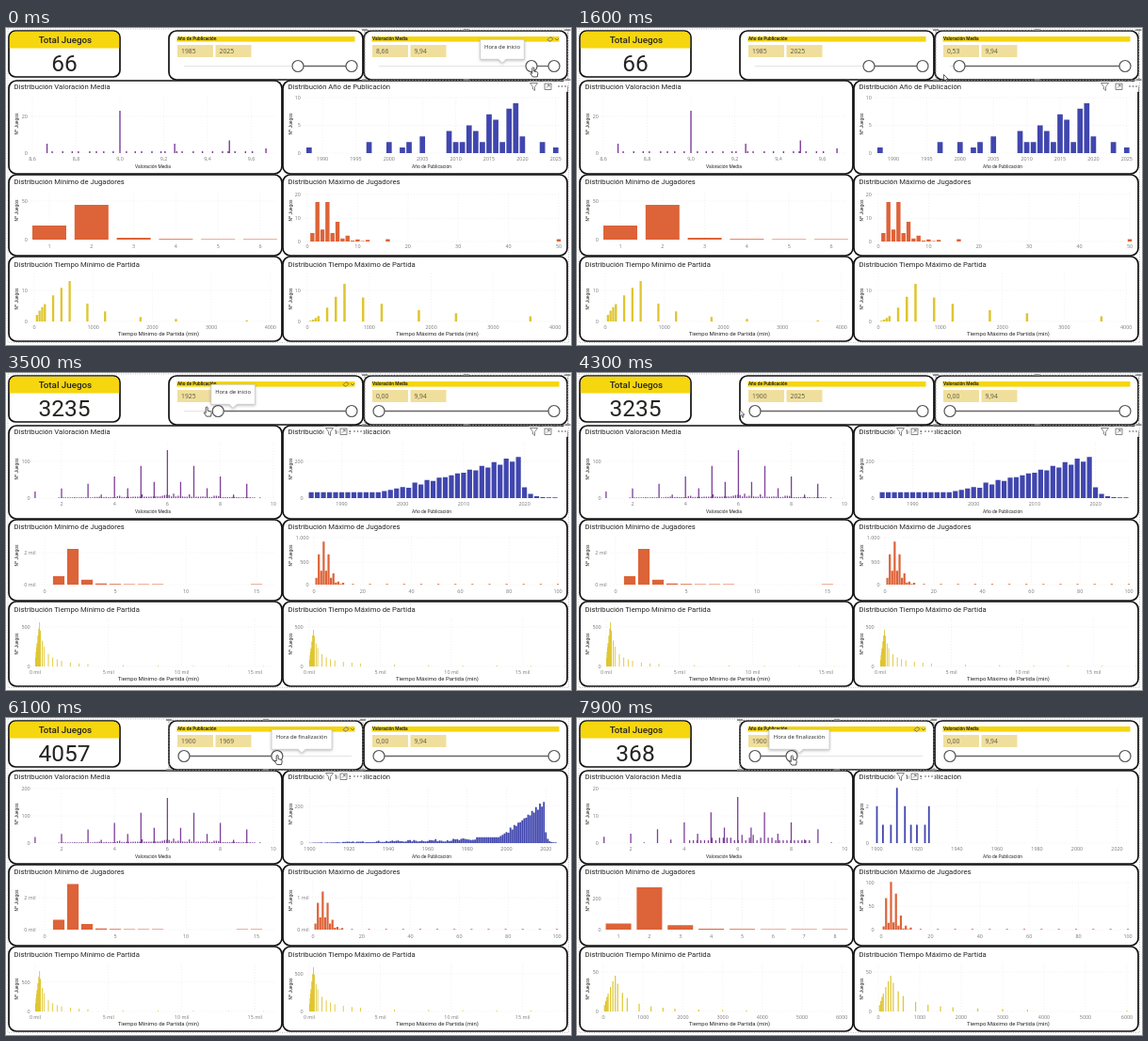
Animation of 600x337 px, one loop 8 s. Source, as an HTML page:

```html
<!DOCTYPE html>
<html lang="es">
<head>
<meta charset="utf-8">
<title>Total Juegos</title>
<style>
html, body { margin: 0; width: 100%; height: 100%; overflow: hidden; background: #fff; }
svg { display: block; width: 100vw; height: 100vh; }
text { font-family: Roboto, sans-serif; fill: #252423; }
.num { font-family: "Open Sans", sans-serif; fill: #777; }
.field { font-family: "Open Sans", sans-serif; fill: #5a5646; }
.mid { text-anchor: middle; }
.end { text-anchor: end; }
.grid { stroke: #e9e9e9; stroke-width: .6; stroke-dasharray: 1 2; }
.panel { fill: #fff; stroke: #111; stroke-width: 1.7; }
.icon { fill: none; stroke: #666; stroke-width: .8; }
</style>
</head>
<body>
<svg id="stage" viewBox="0 0 600 337"></svg>
<script>
const LOOP = 8000;
const YELLOW = '#f5d60f';

let seed = 7;
const rand = () => (seed = seed * 16807 % 2147483647) / 2147483647;

const text = (x, y, size, str, cls = '', extra = '') =>
  `<text x="${x}" y="${y}" font-size="${size}" class="${cls}" ${extra}>${str}</text>`;
const rect = (x, y, w, h, attrs) => `<rect x="${x}" y="${y}" width="${w}" height="${h}" ${attrs}/>`;
const group = (id, body) => `<g id="${id}">${body}</g>`;

// Bars are [axis value, height in px] pairs.
const range = (from, to, step = 1) =>
  Array.from({ length: Math.floor((to - from) / step + 1.001) }, (_, i) => from + i * step);
const bars = (values, height) => values.map(v => [v, height(v)]);
const bell = (x, mid, spread) => Math.exp(-(((x - mid) / spread) ** 2));

// Ratings cluster on whole and half points around 6.
const ratingPeaks = top => bars(range(1, 9.5, .5), v =>
  v % 1 ? top * .36 * bell(v, 6, 2) : top * Math.exp(-.4 * Math.abs(v - 6)));
const ratingNoise = bars(range(1.9, 9.3, .085), v => {
  const b = bell(v, 6, 2.1);
  return .7 + b + (rand() > .6 ? 3.2 * b * rand() : 0);
});
const ratingFew = bars(range(4.2, 8.8, .14), v => 2.9 * (1 + Math.floor(rand() * 3 * bell(v, 6, 1.5))));
const topRatings = [...bars(range(8.68, 9.6, .04).map(v => v + rand() * .03), () => 2),
  [8.667, 10], [9, 45], [9.25, 10], [9.5, 13.5], [9.667, 5]];

// Releases: a flat start, steady growth until 2018, then a collapse.
const releases = y => y > 2019 ? 11 * .35 ** (y - 2020) + .6
  : 6.3 + 35 * Math.max(0, (Math.min(y, 2018) - 1996) / 22) ** 1.1 + (y > 2000 ? 2.5 * Math.cos(y * 3) : 0);
const recentYears = bars(range(1985, 2025), releases);
const oldYears = bars(range(1900, 1984), y => (.4 + (y - 1900) / 17) * (.4 + .6 * rand()));
const topYears = [
  ...bars(range(2009, 2020), y => 5.9 * Math.round(2.5 * 1.107 ** (y - 2009) * (1 + .6 * Math.cos((y - 2009.1) * 2)))),
  ...bars([1988, 2002, 2025], () => 5.9), ...bars([1997, 2000, 2003, 2023], () => 11.8), [2005, 17.7]];
const firstYears = [...bars(range(1900, 1926, 3.4).map(Math.round), () => 19.6),
  ...bars([1900, 1914, 1926], () => 39.2), [1910, 58.8]];

const minPlayers = (one, two, decay, last) => bars(range(1, last), n =>
  n === 1 ? one : n === 2 ? two : two * decay ** (n - 2) + .6);
// Even player counts dominate; sparse crumbs follow further out.
const maxPlayers = (top, mid, odd, crumbs, crumbHeight) => [
  ...bars(range(1, 12), n => top * (n % 2 ? odd : 1) * (bell(n, mid, 3.3) + .04)),
  ...bars(crumbs, () => crumbHeight)];
const crumbs = range(16, 100, 7);

// Round durations: steps widen as the values grow.
function ladder(first, rungs) {
  const values = [first];
  for (const [until, step] of rungs) values.push(...range(values[values.length - 1] + step, until, step));
  return values;
}
const allTimes = ladder(30, [[120, 30], [360, 60], [600, 120], [1800, 300], [3600, 600], [18000, 2400]]);
const fewTimes = ladder(45, [[180, 45], [600, 140], [1200, 300], [2400, 600], [3600, 1200]]);
const durations = (times, mode, top, rise, fall) =>
  bars(times, t => top * (t < mode ? (t / mode) ** rise : (mode / t) ** fall));

// axis: [px at 0, px per unit, first tick, last tick, step]; y: [label, px] pairs; w: bar width
const comma = v => v.toFixed(1).replace('.', ',');
const mil = v => v / 1000 + ' mil';
const year = (px, per, from, first, last, step) => [px - from * per, per, first, last, step];
const view = (axis, y, w, bars, fmt = String) => ({ axis, y, w, bars, fmt });
const ratingAxis = [2.8, 28.1, 2, 10, 2], playersAxis = [41, 15, 0, 15, 5];
const kiloLeft = [31, .01555, 0, 15000, 5000], kiloRight = [322, .0151, 0, 15000, 5000];

const charts = [
  { title: 'Distribución Valoración Media', axisTitle: 'Valoración Media', color: '#7d3f98', col: 0, row: 0, views: [
    view(year(28, 232.5, 8.6, 8.6, 9.65, .2), [['0', 133], ['20', 94]], 1.4, topRatings, comma),
    view(ratingAxis, [['0', 133], ['100', 94]], 1.3, [...ratingNoise, ...ratingPeaks(51)]),
    view(ratingAxis, [['0', 133], ['100', 104], ['200', 75]], 1.3, [...ratingNoise, ...ratingPeaks(48)]),
    view([.3, 28.4, 2, 10, 2], [['0', 133], ['10', 104], ['20', 75]], 1.3, [...ratingFew, ...ratingPeaks(49)])
  ] },
  { title: 'Distribución Año de Publicación', axisTitle: 'Año de Publicación', color: '#4046ae', col: 1, row: 0, views: [
    view(year(336, 7.08, 1990, 1990, 2025, 5), [['0', 133], ['5', 103.5], ['10', 74]], 5.7, topYears),
    view(year(356.5, 6.47, 1990, 1990, 2020, 10), [['0', 133], ['200', 94]], 5.2, recentYears),
    view(year(322.5, 2.09, 1900, 1900, 2020, 20), [['0', 133], ['200', 94]], 1.8, [...oldYears, ...recentYears]),
    view(year(318.5, 2.125, 1900, 1900, 2020, 20), [['0', 133], ['2', 94]], 1.8, firstYears)
  ] },
  { title: 'Distribución Mínimo de Jugadores', color: '#dd6338', col: 0, row: 1, views: [
    view([1.2, 44.8, 1, 6, 1], [['0', 225], ['50', 184]], 36, minPlayers(15, 37, .04, 6)),
    view(playersAxis, [['0 mil', 225], ['2 mil', 191]], 12.2, [...minPlayers(9, 38, .12, 8), [15, .6]]),
    view(playersAxis, [['0 mil', 225], ['2 mil', 191]], 12.2, [...minPlayers(10.5, 48.5, .11, 8), [14, .5], [15, .6]]),
    view([11.2, 32.85, 1, 8, 1], [['0', 225], ['200', 192]], 27, minPlayers(6.5, 45, .09, 8))
  ] },
  { title: 'Distribución Máximo de Jugadores', color: '#dd6338', col: 1, row: 1, views: [
    view([320, 5.34, 0, 50, 10], [['0', 227], ['10', 202.5], ['20', 177]], 4.4, maxPlayers(44, 3, .28, [16, 50], 2.5)),
    view([327, 2.59, 0, 100, 20], [['0', 225], ['500', 201], ['1.000', 175]], 2.2, maxPlayers(44, 4, .35, crumbs, .8)),
    view([326, 2.59, 0, 100, 20], [['0 mil', 225], ['1 mil', 191]], 2.2, maxPlayers(39, 4, .35, crumbs, .8)),
    view([323, 2.62, 0, 100, 20], [['0', 225], ['50', 200], ['100', 175]], 2.2, maxPlayers(49, 4.2, .16, crumbs, .8))
  ] },
  { title: 'Distribución Tiempo Mínimo de Partida', axisTitle: 'Tiempo Mínimo de Partida (min)', color: '#dfc52f', col: 0, row: 2, views: [
    view([30, .0627, 0, 4000, 1000], [['0', 312], ['10', 279]], 2.3, durations(fewTimes, 600, 43, .7, 2)),
    view(kiloLeft, [['0', 312], ['500', 270]], .9, durations(allTimes, 300, 47, .7, 1.15), mil),
    view(kiloLeft, [['0', 312], ['500', 281]], .9, durations(allTimes, 300, 43, .7, 1.15), mil),
    view([28, .0422, 0, 6000, 1000], [['0', 312], ['50', 270]], 1.2, durations(allTimes, 300, 38, .75, 1.4))
  ] },
  { title: 'Distribución Tiempo Máximo de Partida', axisTitle: 'Tiempo Máximo de Partida (min)', color: '#dfc52f', col: 1, row: 2, views: [
    view([320, .0658, 0, 4000, 1000], [['0', 312], ['10', 279]], 2.5, durations(fewTimes, 600, 40, 1.6, 1.1)),
    view(kiloRight, [['0', 312], ['500', 270]], .9, durations(allTimes, 300, 39, .75, 1), mil),
    view(kiloRight, [['0', 312], ['500', 272]], .9, durations(allTimes, 300, 47, .75, 1), mil),
    view([320, .044, 0, 6000, 1000], [['0', 312], ['50', 270]], 1.2, durations(allTimes, 300, 38, .75, 1.2))
  ] }
];

const columns = [{ x: 3, w: 290, first: 26, axisMid: 156 }, { x: 294, w: 302, first: 316, axisMid: 452 }];
const rows = [
  { y: 56, h: 99, title: 65.4, base: 133, ticks: 141, axis: 148.5, size: 4.9, label: 102 },
  { y: 156, h: 86, title: 166, ticks: 234, label: 194 },
  { y: 243, h: 90, title: 253.5, ticks: 319.5, axis: 327, size: 6, label: 288 }
];

function drawView(chart, v) {
  const { x: left, w, first } = columns[chart.col], row = rows[chart.row];
  const [origin, unit, from, to, step] = v.axis;
  const base = v.y[0][1], right = left + w - 8;
  const labelEnd = first - 9 + 2.9 * Math.max(...v.y.map(([label]) => label.length));
  let out = '';
  for (const [label, y] of v.y) {
    out += `<path class="grid" d="M${first} ${y}H${right}"/>` + text(labelEnd, y + 1.8, 5.4, label, 'num end');
  }
  for (const tick of range(from, to, step)) {
    const x = origin + tick * unit;
    out += `<path class="grid" d="M${x} ${row.y + 18}V${base}"/>` + text(x, row.ticks, 5.4, v.fmt(tick), 'num mid');
  }
  const d = v.bars.filter(([, h]) => h > .3)
    .map(([x, h]) => `M${(origin + x * unit - v.w / 2).toFixed(2)} ${base}v${-h.toFixed(2)}h${v.w}v${h.toFixed(2)}z`).join('');
  return out + `<path d="${d}" fill="${chart.color}"/>`;
}

function drawChart(chart, i) {
  const c = columns[chart.col], r = rows[chart.row], labelX = c.x + 9.5;
  return rect(c.x, r.y, c.w, r.h, 'rx="8" class="panel"')
    + chart.views.map((v, k) => group(`view${i}${k}`, drawView(chart, v))).join('')
    + text(c.x + 5.5, r.title, 7.7, chart.title)
    + text(labelX, r.label, 4.9, 'Nº Juegos', 'mid', `transform="rotate(-90 ${labelX} ${r.label})"`)
    + (r.axis ? text(c.axisMid + (r.size > 5 ? 6 : 0), r.axis, r.size, chart.axisTitle, 'mid') : '');
}

const handle = id => `<circle id="${id}" cy="40.5" r="6" fill="#fff" stroke="#555" stroke-width="1.2"/>`;

function drawSlicer(id, x, w, title, trackFrom, trackTo) {
  return rect(x, 3, w, 52, 'rx="8" class="panel"') + rect(x + 8.5, 9, w - 17, 5.6, `fill="${YELLOW}"`)
    + text(x + 9, 13.4, 4.8, title, '', 'font-weight="700"')
    + [9, 49.5].map(dx => rect(x + dx, 18, 38, 13, 'fill="#f0df9c"')).join('')
    + text(x + 13, 26.6, 6.8, '', 'field', `id="${id}Low"`) + text(x + 53.5, 26.6, 6.8, '', 'field', `id="${id}High"`)
    + `<path d="M${trackFrom} 40.5H${trackTo}" stroke="#e4e4e4" stroke-width="1.2"/>`
    + `<path id="${id}Range" stroke="#666" stroke-width="1.3"/>` + handle(id + 'A') + handle(id + 'B')
    + group(id + 'Tools', `<path class="icon" d="M${x + w - 21} 12.5l3-3 3 2-3 3zm8 -1.5l2 2 2-2"/>`);
}

const toolbar = (id, x) => group(id, [0, 15, 30].map(d => rect(x + d - 6, 56.8, 12, 11, 'fill="#fff"')).join('')
  + `<path class="icon" d="M${x - 4} 58.5h8l-3 4v4l-2-1.5v-2.5zm15.5 .5h7v6.5h-7zm2 4.5l3-3m-2 0h2v2"/>`
  + [26.5, 30, 33.5].map(d => `<circle cx="${x + d}" cy="62" r=".8" fill="#555"/>`).join(''));

function selection(id, x, w) {
  const marks = [0, .5, 1].flatMap(k => [2.2, 55.2].map(y => rect(x + k * w - 3, y - 1, 6, 1.8, 'fill="#888"')));
  return group(id, rect(x, 2.5, w, 53, 'fill="none" stroke="#888" stroke-width=".9" stroke-dasharray="2 1.2"') + marks.join(''));
}

const loading = group('loading', charts.map(({ col, row }) => {
  const x = columns[col].x + 3.8, y = rows[row].y + 4;
  return [[0, -1.6], [1.6, 0], [-1.6, 0]].map(([dx, dy]) => `<circle cx="${x + dx}" cy="${y + dy}" r=".7" fill="#777"/>`).join('');
}).join(''));

const stage = document.getElementById('stage');
stage.innerHTML = rect(0, 0, 600, 337, 'fill="#fff"')
  + rect(2, 1, 595.5, 333.5, 'fill="none" stroke="#aaa" stroke-width=".7" stroke-dasharray="1 1.5"')
  + rect(3, 3, 118, 49, 'rx="7" class="panel"')
  + `<path d="M3.8 21.5V10a6 6 0 0 1 6-6.2H114a6 6 0 0 1 6.2 6.2V21.5z" fill="${YELLOW}"/>`
  + text(63, 16, 9.8, 'Total Juegos', 'mid', 'font-weight="500"')
  + text(62, 45.5, 24.5, '', 'mid', 'id="total"')
  + drawSlicer('year', 173, 206, 'Año de Publicación', 189, 367)
  + drawSlicer('rate', 380, 216, 'Valoración Media', 396, 582)
  + charts.map(drawChart).join('') + loading
  + selection('yearSel', 173, 206) + selection('rateSel', 381, 215.5)
  + toolbar('yearBar', 343.5) + toolbar('rateBar', 560.5)
  + group('tip', `<path id="tipBox" fill="#fff" stroke="#c8c8c8" stroke-width=".7" style="filter:drop-shadow(0 1px 1.5px #0004)"/>`
    + text(0, 21.5, 5.9, '', 'mid', 'id="tipText" style="font-family:\'Open Sans\',sans-serif"'))
  + `<path id="hand" fill="#fff" stroke="#222" stroke-width=".8" d="M-1.2 -3.5q1-1.4 2 0v3.6l3 .6q1.2.4 1 1.8l-.6 3.5h-4.8l-2.6-3.8q.4-1.2 2 .2z"/>`
  + `<path id="arrow" fill="#fff" stroke="#222" stroke-width=".7" d="M0 0v6.6l1.6-1.4 1.2 2.6 1.2-.6-1.2-2.4h2z"/>`;

const el = {};
stage.querySelectorAll('[id]').forEach(node => el[node.id] = node);
const show = (id, on) => el[id].style.display = on ? '' : 'none';
const put = (id, str) => el[id].textContent = str;

// Eased value along [time, value] keys.
function track(t, keys) {
  if (t <= keys[0][0]) return keys[0][1];
  for (let i = 1; i < keys.length; i++) {
    const [t1, v1] = keys[i], [t0, v0] = keys[i - 1];
    if (t < t1) {
      const p = (t - t0) / (t1 - t0);
      return v0 + (v1 - v0) * p * p * (3 - 2 * p);
    }
  }
  return keys[keys.length - 1][1];
}
const within = (t, a, b) => t >= a && t < b;
const phase = (t, times) => times.filter(limit => t >= limit).length;

function setSlicer(id, a, b, low, high) {
  el[id + 'A'].setAttribute('cx', a);
  el[id + 'B'].setAttribute('cx', b);
  el[id + 'Range'].setAttribute('d', `M${a} 40.5H${b}`);
  put(id + 'Low', low);
  put(id + 'High', high);
}

function render(t) {
  const yearLow = track(t, [[2800, 310], [3900, 189]]);
  const yearHigh = track(t, [[5500, 367], [6600, 228]]);
  const rateLow = track(t, [[300, 558], [1500, 406], [1650, 406], [1800, 396]]);
  const toYear = x => Math.round(1900 + (x - 189) * 125 / 178);
  setSlicer('year', yearLow, yearHigh, toYear(yearLow), toYear(yearHigh));
  setSlicer('rate', rateLow, 582, ((rateLow - 396) / 186 * 9.94).toFixed(2).replace('.', ','), '9,94');

  put('total', [66, 3235, 4057, 368][phase(t, [2000, 4600, 6800])]);
  const current = phase(t, [2200, 4800, 7200]);
  charts.forEach((c, i) => c.views.forEach((_, k) => show(`view${i}${k}`, k === current)));
  show('loading', within(t, 2000, 2200) || within(t, 4600, 4800) || within(t, 6800, 7200));

  show('rateSel', t < 4500);
  show('yearSel', t >= 4500);
  show('rateBar', t < 4500);
  show('yearBar', t >= 2200);
  show('rateTools', t < 1400);
  show('yearTools', within(t, 2300, 3900) || t >= 5600);

  const ending = t >= 5200;
  const tipX = ending ? track(t, [[5600, 367], [6750, 236]])
    : t < 2000 ? track(t, [[400, 527], [900, 505]]) : track(t, [[2900, 310], [4000, 189]]);
  const half = ending ? 32 : 23.3;
  show('tip', t < 900 || within(t, 2400, 3800) || ending);
  el.tipBox.setAttribute('d', `M${tipX - half} 12.3h${half * 2}v21h${4 - half}l-4 4-4-4h${4 - half}z`);
  put('tipText', ending ? 'Hora de finalización' : 'Hora de inicio');
  el.tipText.setAttribute('x', tipX);

  const x = track(t, [[300, 560], [1450, 389.5], [1850, 389.5], [2400, 308], [2800, 308], [3900, 173], [4600, 173], [5200, 367.5], [5500, 367.5], [6600, 228.5]]);
  const y = track(t, [[300, 46], [1450, 49.5], [1850, 49.5], [2400, 43], [3900, 39.5], [4600, 39.5], [5200, 42.5], [6600, 44]]);
  const pointing = t < 1200 || within(t, 2300, 3800) || t >= 5100;
  show('hand', pointing);
  show('arrow', !pointing);
  el[pointing ? 'hand' : 'arrow'].setAttribute('transform', `translate(${x} ${y})`);
}

const startTime = performance.now();
function loop() {
  render((performance.now() - startTime) % LOOP);
  requestAnimationFrame(loop);
}
loop();
</script>
</body>
</html>
```
